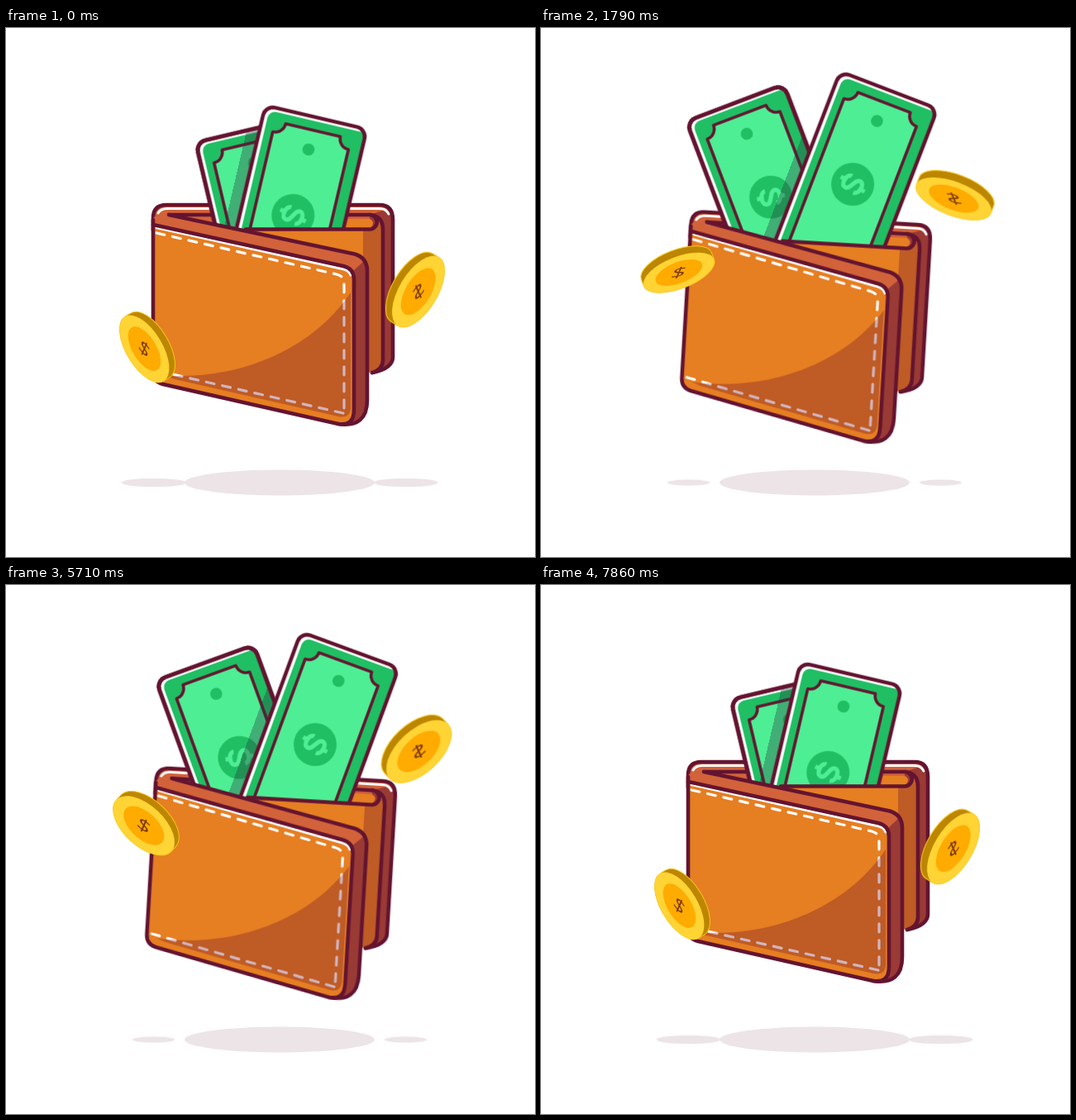
Write an HTML page that moves like this. It is 640x640 px and loops after 9570 ms.

```html
<!DOCTYPE html>
<html lang="en">
<head>
<meta charset="utf-8">
<title>Wallet</title>
<style>
html, body { margin: 0; width: 100%; height: 100%; overflow: hidden; background: #fff; }
svg { display: block; width: 100vw; height: 100vh; }

/* --a is the resting pose, --b the opened one */
.sink, .tilt, .bill, .lift, .spot {
  transform: var(--a);
  animation: 9570ms cubic-bezier(.3, 0, .15, 1) infinite;
}
.sink { --a: translate(0, 0); --b: translate(0, 16px); animation-name: sink; }
.tilt {
  --a: rotate(0deg);
  --b: rotate(3.4deg);
  transform-origin: 320px 284px;
  animation-name: tilt;
}
.bill { animation-name: bill; }
.bill.back {
  --a: translate(300px, 163px) rotate(-13.3deg);
  --b: translate(249px, 128px) rotate(-20.8deg);
}
.bill.front {
  --a: translate(366px, 147px) rotate(13.2deg);
  --b: translate(406.5px, 112.5px) rotate(21deg);
}
.lift.left { --a: translate(171px, 386px); --b: translate(171px, 288px); animation-name: left; }
.lift.right { --a: translate(495px, 316.5px); --b: translate(495px, 198px); animation-name: right; }
.spot { --a: scale(1); --b: scale(.66, .7); animation-name: spot; }

@keyframes sink {
  0%, 1.04% { transform: var(--a); }
  13.58%, 58.42% { transform: var(--b); }
  70.96%, 100% { transform: var(--a); }
}
@keyframes tilt {
  0%, .5% { transform: var(--a); }
  12.54%, 60.24% { transform: var(--b); }
  72.2%, 100% { transform: var(--a); }
}
@keyframes bill {
  0%, 2.4% { transform: var(--a); }
  14.94%, 57.95% { transform: var(--b); }
  70.49%, 100% { transform: var(--a); }
}
@keyframes left {
  0%, .52% { transform: var(--a); }
  13.06%, 64.89% { transform: var(--b); }
  77.43%, 100% { transform: var(--a); }
}
@keyframes right {
  0%, 4.18% { transform: var(--a); }
  16.72%, 69.38% { transform: var(--b); }
  81.92%, 100% { transform: var(--a); }
}
@keyframes spot {
  0% { transform: var(--a); }
  12.54%, 70.11% { transform: var(--b); }
  82.13%, 100% { transform: var(--a); }
}

.line { fill: none; stroke: #641430; stroke-width: 4.6; stroke-linecap: round; stroke-linejoin: round; }
.shade { fill: #640a2c; opacity: .3; }
.cast { fill: #2a3a3c; opacity: .35; }
.orange { fill: #e67e22; }
.rust { fill: #d2623a; }
.wine { fill: #9a3a34; }
.shine { fill: none; stroke: #fff; stroke-width: 3; stroke-linecap: round; }
.seam { fill: none; stroke: #fff; stroke-width: 3.2; stroke-linecap: round; stroke-dasharray: 10 10; }
.coin text { font: 34px "Open Sans", "Noto Sans", sans-serif; text-anchor: middle; fill: #7d3a0c; }
</style>
</head>
<body>
<svg viewBox="0 0 640 640">
  <defs>
    <clipPath id="note"><rect x="-63" y="-40" width="126" height="245" rx="12"/></clipPath>
    <clipPath id="backNote"><rect class="bill back" x="-63" y="-40" width="126" height="245" rx="12"/></clipPath>
    <g id="bill">
      <g clip-path="url(#note)">
        <rect x="-63" y="-40" width="126" height="245" fill="#fff"/>
        <rect x="-57.2" y="-35.2" width="130" height="260" rx="9" fill="#20bf63"/>
      </g>
      <path class="line" style="fill:#4eee94;stroke-width:3.6"
        d="M-34-24H34A13 13 0 0 0 47-11V215H-47V-11A13 13 0 0 0-34-24Z"/>
      <circle r="7.3" fill="#20bf63"/>
      <circle cy="82" r="26" fill="#20bf63"/>
      <path transform="translate(0 82) rotate(102)" fill="none" stroke="#4eee94" stroke-width="5.2"
        d="M8-6C7-13-8-13-8-6C-8 1 8-1 8 6C8 13-8 13-8 6M0-11V-17M0 11V17"/>
      <rect class="line" x="-63" y="-40" width="126" height="245" rx="12"/>
    </g>
  </defs>

  <g fill="#ece4e7">
    <ellipse cx="331" cy="550" rx="115" ry="15.5"/>
    <g transform="translate(178.5 550)"><ellipse class="spot" rx="39" ry="5.2"/></g>
    <g transform="translate(483.5 550)"><ellipse class="spot" rx="39" ry="5.2"/></g>
  </g>

  <g class="sink"><g class="tilt">
    <path class="rust" d="M178 245V230Q178 214 194 214H452Q468 214 468 232V260H178Z"/>
    <path class="wine" d="M440 226L461 219Q468 222 468 232V398Q468 412 443 417Z"/>
    <path class="shine" d="M184 224Q187 218.5 195 218.5H452Q460 218.5 463 225"/>
    <path class="rust" d="M197 226H440V246H290Z"/>
    <path class="orange" d="M400 231H440Q448 235 440 243H400Z"/>
    <path class="line" d="M178 245V230Q178 214 194 214H452Q468 214 468 232V398Q468 412 443 417M197 226H440"/>
  </g></g>

  <use class="bill back" href="#bill"/>
  <g clip-path="url(#backNote)">
    <g class="bill front"><rect class="cast" x="-78" y="-60" width="20" height="290"/></g>
  </g>
  <rect class="bill back line" x="-63" y="-40" width="126" height="245" rx="12"/>
  <use class="bill front" href="#bill"/>

  <g class="sink"><g class="tilt">
    <path class="orange" d="M285 243.5H440Q449 243 449 232Q456 234 456 244V402Q456 414 443 417L400 410Z"/>
    <path class="shade" d="M432 245H442Q449 243 450 234Q456 236 456 244V402Q456 414 443 417L432 416Z"/>
    <path class="line" d="M290 243.5H440A8.7 8.7 0 0 0 440 226Q456 227 456 244V402Q456 413 443 417"/>

    <path class="wine" d="M197 226L422 273.5Q437 278 437 294V450Q437 484 402 479L190 431Z"/>
    <path class="rust" d="M178 240V230Q186 222 197 226L422 273.5Q429 275 433 282L420 294L408 288Z"/>
    <path class="orange" d="M178 238L408 288Q421 291 421 304V462Q421 482 402 479L190 431Q178 428 178 416Z"/>
    <path class="shine" d="M182 241.5L407 291.5Q415 293 417 299"/>
    <path class="seam" d="M182 248L400 298Q409 300 409 309V464"/>
    <path class="seam" d="M408 466L184 415"/>
    <path class="shade" d="M190 420C280 427 370 390 417 320V458Q417 473 402 470L200 424Z"/>
    <path class="line" d="M178 238L408 288Q421 291 421 304V462Q421 482 402 479"/>
    <path class="line" d="M178 232V416Q178 428 190 431L402 479Q437 484 437 450V294Q437 278 422 273.5L197 226"/>
  </g></g>

  <g class="lift left"><g class="coin"></g></g>
  <g class="lift right"><g transform="scale(-1.06 1.06)"><g class="coin"></g></g></g>
</svg>

<script>
const LOOP = 9570, R = 45.5, HALF = 4.7;
const SPINS = [{ at: 563, span: 2158, dir: 1 }, { at: 5474, span: 1893, dir: -1 }];

const cross = (a, b) => [
  a[1] * b[2] - a[2] * b[1],
  a[2] * b[0] - a[0] * b[2],
  a[0] * b[1] - a[1] * b[0]
];
const mix = (a, p, b, q) => a.map((v, i) => v * p + b[i] * q);

// The disc turns about an axis lying in its own plane.
const axis = [-.22, .5, .835];
const rest = [.75, -.45, .48];
const side = cross(axis, rest);

// Bezier easing (.4, 0, .3, 1), solved by bisection.
function ease(x) {
  if (x <= 0 || x >= 1) return x <= 0 ? 0 : 1;
  let lo = 0, hi = 1;
  for (let i = 0; i < 24; i++) {
    const t = (lo + hi) / 2, u = 1 - t;
    if (3 * u * u * t * .4 + 3 * u * t * t * .3 + t * t * t < x) lo = t;
    else hi = t;
  }
  return lo * lo * (3 - 2 * lo);
}

const coins = [...document.querySelectorAll('.coin')];
for (const coin of coins) {
  coin.innerHTML = `<g><path fill="#bd8600" stroke="#f7c71c"/>
    <ellipse fill="#ffd434"/><ellipse fill="#ffab00"/></g><text y="12">$</text>`;
}

function pose(coin, angle) {
  const c = Math.cos(angle), s = Math.sin(angle);
  const n = mix(rest, c, side, s), w = mix(side, c, rest, -s);
  const tilt = Math.atan2(n[1], n[0]);
  const h = HALF * Math.hypot(n[0], n[1]), r = R * Math.abs(n[2]);
  const sign = n[2] < 0 ? -1 : 1, face = -sign * h;
  const x = 6 * s, y = 6 * (1 - c);
  const [body, label] = coin.children;
  const [edge, rim, core] = body.children;

  body.setAttribute('transform', `translate(${x} ${y}) rotate(${tilt * 180 / Math.PI})`);
  edge.setAttribute('d', `M${-h} ${-R}H${h}A${r} ${R} 0 0 1 ${h} ${R}H${-h}A${r} ${R} 0 0 1 ${-h} ${-R}Z`);
  [[rim, 1], [core, .66]].forEach(([el, k]) => {
    el.setAttribute('cx', face);
    el.setAttribute('rx', r * k);
    el.setAttribute('ry', R * k);
  });
  label.setAttribute('transform', `matrix(${w[0] * sign} ${w[1] * sign} ${axis[0]} ${axis[1]} ${
    x + face * Math.cos(tilt)} ${y + face * Math.sin(tilt)})`);
}

let start;
function frame(now) {
  start ??= now;
  const t = (now - start) % LOOP;
  const turns = SPINS.reduce((sum, p) => sum + p.dir * ease((t - p.at) / p.span), 0);
  for (const coin of coins) pose(coin, turns * 2 * Math.PI);
  requestAnimationFrame(frame);
}
for (const coin of coins) pose(coin, 0);
requestAnimationFrame(frame);
</script>
</body>
</html>
```
